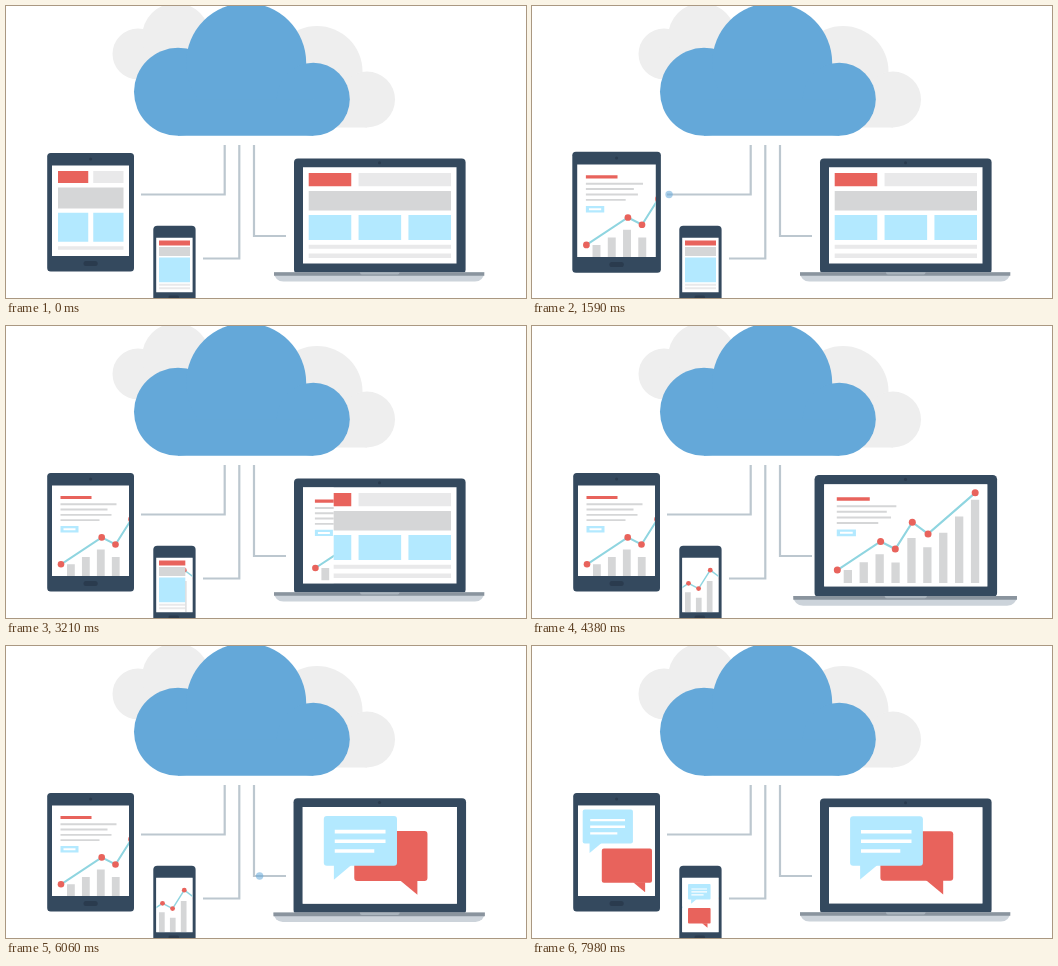
An HTML page with a canvas for the animation above (8 s loop, 520 by 292 pixels).

```html
<!DOCTYPE html>
<html lang="en">
<head>
<meta charset="utf-8">
<title>Cloud sync</title>
<style>
  html, body { margin: 0; height: 100%; overflow: hidden; background: #fff; }
  canvas { display: block; width: 520px; height: 292px; }
</style>
</head>
<body>
<canvas id="stage"></canvas>
<script>
const LOOP = 8000;
const canvas = document.getElementById('stage');
const ctx = canvas.getContext('2d');
const ratio = window.devicePixelRatio || 1;
canvas.width = 520 * ratio;
canvas.height = 292 * ratio;

const NAVY = '#34495e', DARK = '#2a3b4e', RED = '#e8635c', SKY = '#b3e9ff';
const GRAY = '#d5d6d7', PALE = '#e9e9ea', TEAL = '#8fd5e0', WIRE = '#bcc7cf';

// Timing
const ease = p => p < .5 ? 2 * p * p : 1 - 2 * (1 - p) ** 2;
const backOut = p => 1 + 2.7 * (p - 1) ** 3 + 1.7 * (p - 1) ** 2;
const span = (t, from, to) => Math.min(1, Math.max(0, (t - from) / (to - from)));
const eased = (t, from, to) => ease(span(t, from, to));
const pulse = (t, from, to) => Math.sin(Math.PI * span(t, from, to));
const zoom = (t, grow, shrink) =>
  1 + .145 * (eased(t, grow, grow + 450) - eased(t, shrink, shrink + 430));

// Drawing
function box(color, x, y, w, h, radius = 0) {
  ctx.fillStyle = color;
  ctx.beginPath();
  ctx.roundRect(x, y, w, h, radius);
  ctx.fill();
}

function disc(color, x, y, r) {
  ctx.fillStyle = color;
  ctx.beginPath();
  ctx.arc(x, y, r, 0, 7);
  ctx.fill();
}

function trace(points) {
  ctx.beginPath();
  points.forEach(([x, y]) => ctx.lineTo(x, y));
}

function stroke(color, width, points) {
  trace(points);
  ctx.strokeStyle = color;
  ctx.lineWidth = width;
  ctx.stroke();
}

// Moves the origin to x, y while drawing
function placed(x, y, scale, draw, angle = 0) {
  ctx.save();
  ctx.translate(x, y);
  ctx.rotate(angle);
  ctx.scale(scale, scale);
  draw();
  ctx.restore();
}

function zoomed(cx, cy, scale, draw) {
  placed(cx * (1 - scale), cy * (1 - scale), scale, draw);
}

function clipped(x, y, w, h, draw) {
  ctx.save();
  ctx.beginPath();
  ctx.rect(x, y, w, h);
  ctx.clip();
  draw();
  ctx.restore();
}

function faded(alpha, draw) {
  ctx.save();
  ctx.globalAlpha = alpha;
  draw();
  ctx.restore();
}

// Clouds: round lobes on a flat base running from the first lobe to the last
function cloud(color, lobes) {
  lobes.forEach(lobe => disc(color, ...lobe));
  const [x1, y1, r1] = lobes[0];
  const [x2, y2, r2] = lobes[lobes.length - 1];
  const top = Math.max(y1, y2);
  box(color, x1, top, x2 - x1, Math.min(y1 + r1, y2 + r2) - top);
}

function clouds(flash) {
  cloud('#eee', [[132, 48, 25.5], [170, 31, 34]]);
  cloud('#eee', [[311, 65.5, 45.5], [361, 93.5, 28]]);
  box('#eee', 300, 93, 61, 28.5);
  const blue = `rgb(${100 + 22 * flash},${168 + 15 * flash},${217 + 10 * flash})`;
  cloud(blue, [[172, 85.8, 44], [240.2, 57, 60], [307.3, 93.3, 36.5]]);
}

// Wires run down from the cloud, then sideways to a device
const wires = {
  tablet: [[218.7, 139], [218.7, 188.5], [135, 188.5]],
  phone: [[233.3, 139], [233.3, 252.5], [197, 252.5]],
  laptop: [[248, 139], [248, 230], [280, 230]]
};

function signal([start, corner, end], p) {
  if (p <= 0 || p >= 1) return;
  const down = corner[1] - start[1];
  const across = end[0] - corner[0];
  const distance = ease(p) * (down + Math.abs(across));
  const x = start[0] + Math.sign(across) * Math.max(0, distance - down);
  const y = start[1] + Math.min(distance, down);
  faded(.55, () => disc('#64a8d9', x, y, 3.7));
}

// Stacked page blocks: header, banner, row of cards, then thin lines
function wireframe(x, y, width, gap, columns, gutter, heights) {
  const cell = (width + gutter) / columns - gutter;
  heights.forEach((h, row) => {
    if (row === 0) {
      box(RED, x, y, cell, h);
      if (columns > 1) box(PALE, x + cell + gutter, y, width - cell - gutter, h);
    } else if (row === 2) {
      for (let i = 0; i < columns; i++) box(SKY, x + i * (cell + gutter), y, cell, h);
    } else {
      box(row === 1 ? GRAY : PALE, x, y, width, h);
    }
    y += h + gap;
  });
}

// One chart, shown whole or cropped; its origin is the first point
const trend = [[0, 0], [40.7, -26.9], [54.5, -19.8], [70.5, -45], [85.3, -34], [129.6, -72.6]];

function trendAt(x) {
  const i = Math.max(1, trend.findIndex(point => point[0] >= x));
  const [[x1, y1], [x2, y2]] = [trend[i - 1], trend[i]];
  return y1 + (y2 - y1) * (x - x1) / (x2 - x1);
}

function chartText(grow) {
  box(RED, -.5, -68.4, 31 * grow, 3.2);
  for (let i = 0; i < 4; i++) {
    const width = 56 - 4 * i - 5 * (i % 2 ? 1 : 0) + 3 * (i === 2);
    box(GRAY, -.5, -61 + 5.3 * i, width * grow, 1.9);
  }
  faded(grow, () => {
    box(SKY, -.5, -38.2, 18, 6.3);
    box('#fff', 2.5, -36, 12, 1.9);
  });
}

function chart(x, y, scale, bars, grow = 1) {
  if (grow <= 0) return;
  placed(x, y, scale, () => {
    if (scale === 1) chartText(grow);
    for (let i = 0; i < bars; i++) {
      const left = 6 + 14.95 * i;
      const top = trendAt(left + 3.9) + 6.5 + 7 * Math.sin(Math.PI * i / 8);
      box(GRAY, left, 12.2 - (12.2 - top) * grow, 7.8, (12.2 - top) * grow);
    }
    clipped(-4, -90, 138 * grow, 110, () => {
      stroke(TEAL, 2, trend);
      trend.forEach(([px, py]) => disc(RED, px, py, 3.3));
    });
  });
}

// Speech bubble around its centre; the red one is the mirror image without text
function bubble(x, y, scale, mirrored, angle = 0) {
  placed(x, y, scale, () => {
    if (mirrored) ctx.scale(-1, 1);
    box(mirrored ? RED : SKY, -36.4, -24.8, 72.8, 49.6, 3);
    trace([[-26.4, 24], [-26.4, 38.5], [-9, 24]]);
    ctx.fill();
    for (let i = 0; i < 3 && !mirrored; i++) {
      box('#fff', -25.5, -11 + 9.6 * i, i < 2 ? 50.5 : 39.3, 3.5);
    }
  }, angle);
}

function laptopChat(t) {
  const size = backOut(span(t, 4980, 5280));
  const near = 1 - eased(t, 5250, 5650);
  if (size <= 0) return;
  bubble(384.8 - 6.8 * near, 210 - 5.6 * near, size, true);
  bubble(354.5 + 9.4 * near, 195 - 1.4 * near, size, false, .047 * near);
}

// Screens
function screen(area, draw) {
  box('#fff', ...area);
  clipped(...area, draw);
}

// New content covers the old from the side the wire reaches
function wipe([x, y, w, h], p, fromLeft, next) {
  if (p <= 0) return;
  clipped(fromLeft ? x : x + w * (1 - p), y, w * p, h, () => {
    box('#fff', x, y, w, h);
    next();
  });
}

function tablet(t, chatWipe) {
  const area = [46, 159.5, 77, 90.5];
  zoomed(84.6, 206.3, zoom(t, 360, 1275), () => {
    box(NAVY, 41.2, 147, 86.8, 118.6, 3.5);
    disc(DARK, 84.6, 153, 1.5);
    box(DARK, 77.5, 255, 14.2, 5, 2.5);
    screen(area, () => {
      faded(1 - eased(t, 480, 700), () =>
        wireframe(52, 165, 65.5, 4.4, 2, 5, [12, 21, 29, 3.5]));
      chart(55, 238.3, 1, 4, eased(t, 700, 1160));
      wipe(area, chatWipe, false, () => {
        bubble(75.8, 180.5, .69, false);
        bubble(94.9, 219.7, .69, true);
      });
    });
  });
}

function phone(chartWipe, chatWipe) {
  const area = [150.2, 231.7, 36.4, 54.5];
  box(NAVY, 147.3, 219.8, 42.3, 84, 4);
  box(DARK, 162.5, 289.6, 10.5, 3.4, 1.5);
  screen(area, () => {
    wireframe(153, 234.5, 31, 1.5, 1, 0, [5, 9, 24.7, 2, 2]);
    wipe(area, chartWipe, false, () => chart(126.8, 277, .73, 5));
    wipe(area, chatWipe, false, () => {
      bubble(167.3, 245.8, .31, false);
      bubble(167.3, 269.7, .31, true);
    });
  });
}

function laptop(t, chartWipe) {
  const area = [297, 161.3, 153.5, 96.1];
  zoomed(373.5, 209.5, zoom(t, 4170, 5690), () => {
    box(NAVY, 288, 152.6, 171.6, 115, 4);
    disc(DARK, 373.5, 156.8, 1.5);
    box('#ccd3da', 268, 266.3, 210.3, 9.3, [0, 0, 10, 10]);
    box('#8a949e', 268, 266.3, 210.3, 3.5);
    box('#a9b3bc', 354, 266.3, 39.5, 2.3, [0, 0, 2, 2]);
    screen(area, () => {
      wireframe(302.7, 167, 142.3, 4.7, 3, 7.3, [13.2, 19.5, 25, 4, 4.5]);
      wipe(area, chartWipe, true, () => {
        chart(309.4, 242, 1, 9, 1 - eased(t, 4560, 4920));
        laptopChat(t);
      });
    });
  });
}

function render(t) {
  ctx.setTransform(ratio, 0, 0, ratio, 0, 0);
  box('#fff', 0, 0, 520, 292);

  Object.values(wires).forEach(points => stroke(WIRE, 2.2, points));
  const firstDown = span(t, 2260, 2740);
  const secondDown = span(t, 6600, 7060);
  signal(wires.tablet, 1 - span(t, 1555, 1965));
  signal(wires.phone, firstDown);
  signal(wires.laptop, firstDown);
  signal(wires.laptop, 1 - span(t, 5930, 6330));
  signal(wires.phone, secondDown);
  signal(wires.tablet, secondDown);
  clouds(pulse(t, 1970, 2350) + pulse(t, 6330, 6710));

  const chartWipe = eased(t, 3045, 3570);
  const chatWipe = eased(t, 7370, 7900);
  tablet(t, chatWipe);
  phone(chartWipe, chatWipe);
  laptop(t, chartWipe);
}

const began = performance.now();
function frame() {
  render((performance.now() - began) % LOOP);
  requestAnimationFrame(frame);
}
frame();
</script>
</body>
</html>
```
